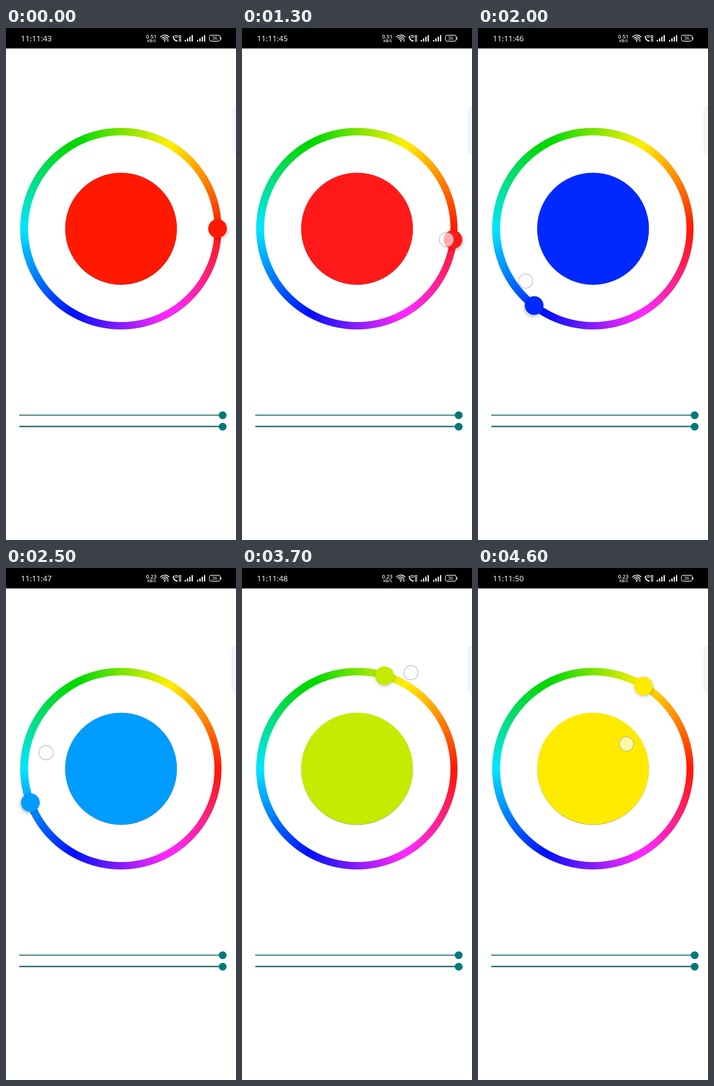
An HTML page with a canvas for the animation above (4700 ms loop, 502x1116 px).

```html
<!DOCTYPE html>
<html lang="en">
<head>
<meta charset="utf-8">
<title>Colour ring picker</title>
<style>
  html, body { margin: 0; width: 100%; height: 100%; overflow: hidden; background: #fff; }
  canvas { display: block; width: 502px; height: 1116px; }
</style>
</head>
<body>
<canvas id="stage" width="502" height="1116"></canvas>
<script>
const ctx = document.getElementById('stage').getContext('2d');
const LOOP = 4700, STEP = 100, TAU = Math.PI * 2;
const CX = 250.7, CY = 437.2, RING = 211;
const LIGHT = '#f0f0f0', EDGE = '#7c888e';

// One drag: knob angle, how far the finger leads it (degrees), finger distance from the centre
const DRAG = [
  { at: 800, knob: 0, lead: 0, reach: 204 },
  { at: 1300, knob: -6.5, lead: -0.5, reach: 197 },
  { at: 1700, knob: -75.8, lead: -3, reach: 256 },
  { at: 1900, knob: -121, lead: -11, reach: 190 },
  { at: 2500, knob: -159.4, lead: -32.6, reach: 167 },
  { at: 3700, knob: -286.6, lead: -12.9, reach: 240 },
  { at: 4200, knob: -592, lead: -25.6, reach: 126.6 },
  { at: 4600, knob: -661.5, lead: -22.3, reach: 91 }
];

const clamp = v => Math.min(1, Math.max(0, v));

function pose(t) {
  const i = Math.max(1, DRAG.findIndex(p => p.at >= t));
  const a = DRAG[i - 1], b = DRAG[i];
  const k = clamp((t - a.at) / (b.at - a.at));
  const mix = key => a[key] + (b[key] - a[key]) * k;
  return { knob: mix('knob'), finger: mix('knob') + mix('lead'), reach: mix('reach') };
}

// Pure hue, encoded as BT.601 and decoded as BT.709
function hueAt(deg) {
  const band = mid => {
    const d = Math.abs((((deg - mid) % 360) + 540) % 360 - 180);
    return clamp(2 - d / 60);
  };
  const r = band(0), g = band(120), b = band(240);
  const y = 0.299 * r + 0.587 * g + 0.114 * b;
  const cb = (b - y) / 1.772, cr = (r - y) / 1.402;
  const out = [y + 1.5748 * cr, y - 0.1873 * cb - 0.4681 * cr, y + 1.8556 * cb];
  return `rgb(${out.map(v => Math.round(255 * clamp(v))).join(',')})`;
}

function polar(deg, r) {
  const a = deg * Math.PI / 180;
  return [CX + r * Math.cos(a), CY - r * Math.sin(a)];
}

function disc(x, y, r, color) {
  ctx.beginPath();
  ctx.arc(x, y, r, 0, TAU);
  ctx.fillStyle = color;
  ctx.fill();
}

function rect(x, y, w, h, color) {
  ctx.fillStyle = color;
  ctx.fillRect(x, y, w, h);
}

function text(str, x, y, font, align = 'center') {
  ctx.font = font;
  ctx.textAlign = align;
  ctx.fillStyle = LIGHT;
  ctx.fillText(str, x, y);
}

// Upward-facing arcs, as in a radio symbol
function waves(x, y, first, gap, count, width) {
  ctx.strokeStyle = LIGHT;
  ctx.lineWidth = width;
  for (let i = 0; i < count; i++) {
    ctx.beginPath();
    ctx.arc(x, y, first + i * gap, -Math.PI * 0.77, -Math.PI * 0.23);
    ctx.stroke();
  }
}

function drawWifi() {
  waves(346.5, 28.5, 5, 4, 3, 1.8);
  disc(346.5, 28, 1.8, LIGHT);
  ctx.beginPath();
  for (const dir of [-1, 1]) {
    const y = 26.3 + dir * 0.8;
    ctx.moveTo(351, y);
    ctx.lineTo(353.2, y + dir * 2.8);
    ctx.lineTo(355.4, y);
  }
  ctx.fill();
}

function drawCall() {
  waves(371.5, 23.5, 3.5, 3.5, 2, 1.4);
  ctx.lineWidth = 2.4;
  ctx.beginPath();
  ctx.moveTo(365, 17.5);
  ctx.quadraticCurveTo(365, 27.5, 374.5, 28.5);
  ctx.stroke();
  ctx.lineWidth = 1.4;
  for (const y of [16.3, 23.8]) ctx.strokeRect(378.3, y, 3.2, 5);
}

function drawBars(x) {
  for (let i = 0; i < 4; i++) {
    const h = 3.5 + i * 3.5;
    rect(x + i * 5, 29.5 - h, 2.8, h, LIGHT);
  }
}

function drawBattery() {
  ctx.lineWidth = 1.4;
  ctx.beginPath();
  ctx.roundRect(444, 15.8, 23.5, 13, 4);
  ctx.stroke();
  rect(468.6, 20, 1.4, 5, LIGHT);
  text('36', 455.6, 26.2, '10.5px "Noto Sans", sans-serif');
}

function drawStatus(t) {
  rect(0, 0, 502, 44.6, '#000');
  const seconds = Math.floor(43.6 + 1.4 * t / 1000);
  text('11:11:' + seconds, 32.5, 28.6, '17px "Noto Sans", sans-serif', 'left');
  text(t < 2200 ? '0.51' : '0.23', 317.2, 23, '600 11.5px "Open Sans", sans-serif');
  text('KB/S', 317.8, 30.5, '600 8.3px "Open Sans", sans-serif');
  drawWifi();
  drawCall();
  drawBars(390);
  drawBars(417);
  drawBattery();
}

function drawTab(t) {
  ctx.beginPath();
  ctx.roundRect(493.5, 171.5, 20, 103, 6);
  ctx.fillStyle = '#f7f7f7';
  ctx.fill();
  if (t < STEP) return;
  ctx.strokeStyle = '#e3e3e3';
  ctx.lineWidth = 1;
  ctx.stroke();
}

const wheel = ctx.createConicGradient(0, CX, CY);
for (let deg = 0; deg <= 360; deg += 4) wheel.addColorStop(1 - deg / 360, hueAt(deg));

function drawRing() {
  disc(CX, CY + 0.4, 219.7, EDGE);
  disc(CX, CY, 219.5, wheel);
  disc(CX + 0.9, CY + 0.3, 203.4, '#fff');
}

function drawKnob(deg, color) {
  const [x, y] = polar(deg, RING);
  ctx.save();
  ctx.shadowColor = 'rgba(0,0,0,.24)';
  ctx.shadowBlur = 7;
  ctx.shadowOffsetX = (x - CX) / 90;
  ctx.shadowOffsetY = 1 + y / 220;
  disc(x, y, 20.4, color);
  ctx.restore();
}

function drawSlider(y, top, bottom) {
  rect(29, y - 2, 444, 1.3, top);
  rect(29, y - 0.7, 444, 1.9, bottom);
  disc(472.9, y, 8.6, '#007a78');
}

function drawTouch(deg, reach) {
  const [x, y] = polar(deg, reach);
  disc(x, y, 15.5, 'rgba(255,255,255,.64)');
  ctx.strokeStyle = 'rgba(150,145,185,.5)';
  ctx.lineWidth = 2;
  ctx.stroke();
}

function draw(t) {
  const { knob, finger, reach } = pose(t);
  const color = hueAt(knob);
  rect(0, 0, 502, 1116, '#fff');
  drawStatus(t);
  drawTab(t);
  drawRing();
  disc(CX + 0.4, CY + 0.8, 122, EDGE);
  disc(CX + 0.4, CY + 0.2, 122, color);
  drawKnob(knob, color);
  drawSlider(844, '#6fd2cb', '#4a666d');
  drawSlider(869, '#00706c', '#2f6468');
  if (t > DRAG[0].at) drawTouch(finger, reach);
}

const start = performance.now();
function tick() {
  let t = Math.floor((performance.now() - start) % LOOP / STEP) * STEP;
  if (t > 500 && t < 800) t = 500;
  draw(t);
  requestAnimationFrame(tick);
}
tick();
</script>
</body>
</html>
```
